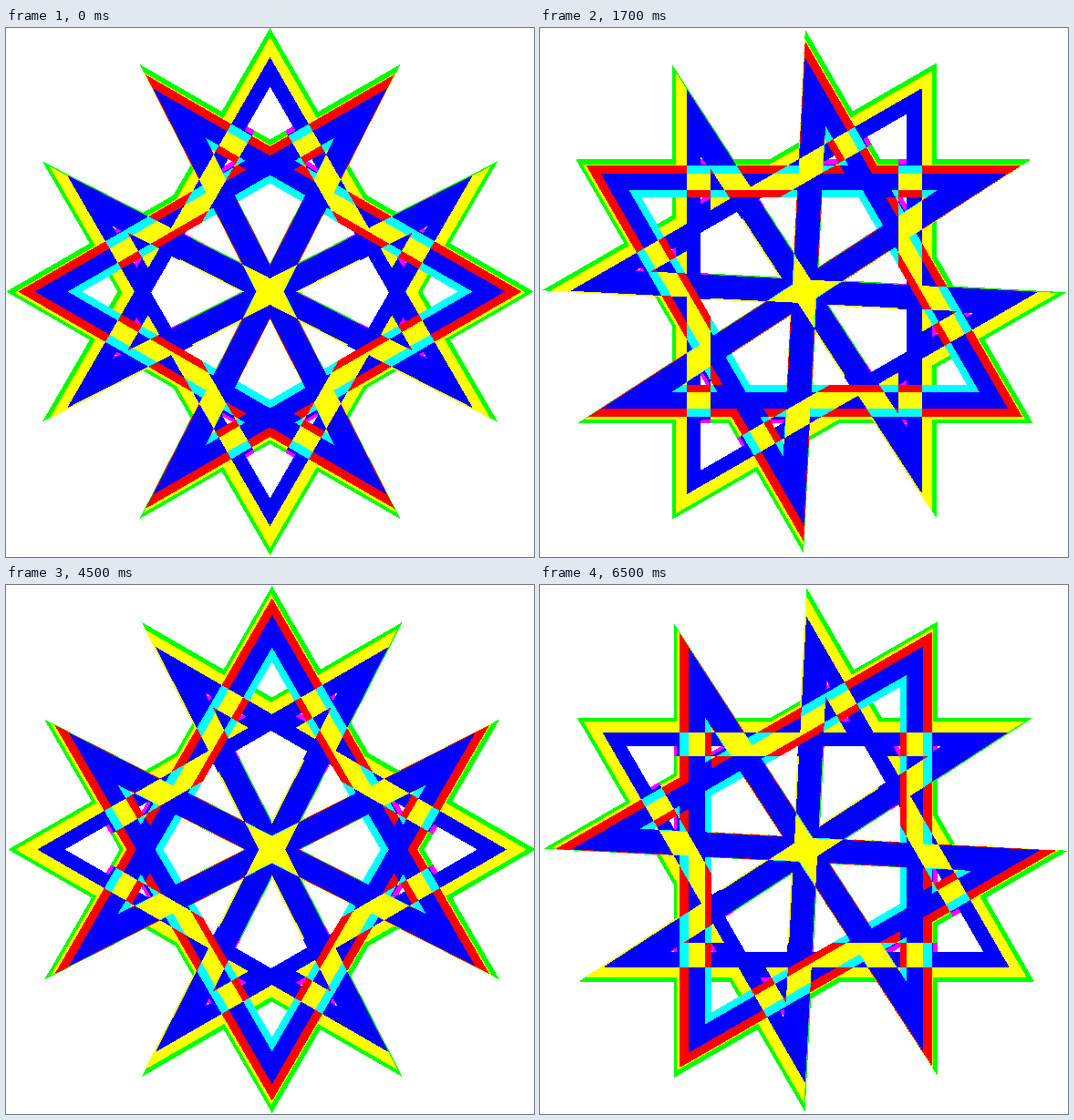
These frames come from a looping animation (579x581 px, 8000 ms). An HTML page with a canvas:

```html
<!DOCTYPE html>
<html lang="en">
<head>
<meta charset="utf-8">
<title>Turning star</title>
<style>
  html, body { margin: 0; width: 100%; height: 100%; overflow: hidden; background: #fff; }
  canvas { display: block; }
</style>
</head>
<body>
<canvas id="stage" width="579" height="581"></canvas>
<script>
const W = 579, H = 581, LOOP = 8000, STEP = 2000, LEAD = 1500;
const RAD = Math.PI / 180;
const EDGE = 144.7;          // distance from the centre to the outer chords
const TILT = 27 * RAD;       // slope of the bars through the centre
const CENTRES = [[289.5, 289.5], [289.9, 289.2], [291.2, 289.7], [291.7, 290.5], [291.5, 290.7]];

const stage = document.getElementById('stage').getContext('2d');
const scratch = document.createElement('canvas');
scratch.width = W;
scratch.height = H;
const pen = scratch.getContext('2d', { willReadFrequently: true });

// Strokes the six-cornered ribbon whose chords lie between two depths.
function ribbon(near, far) {
  const chord = EDGE - (near + far) / 2;
  const reach = chord / Math.cos(TILT + 30 * RAD);
  const x = reach * Math.cos(TILT), y = reach * Math.sin(TILT), tip = 2 * chord;
  pen.lineWidth = far - near;
  pen.beginPath();
  for (const p of [[0, -tip], [x, y], [-x, -y], [0, tip], [x, -y], [-x, y]]) pen.lineTo(...p);
  pen.closePath();
  pen.stroke();
}

// Alpha mask of the ribbon, drawn once for each of the given turns.
function mask([cx, cy], angle, turns, near, far, drop = 0) {
  pen.setTransform(1, 0, 0, 1, 0, 0);
  pen.clearRect(0, 0, W, H);
  for (const turn of turns) {
    pen.setTransform(1, 0, 0, 1, cx, cy);
    pen.rotate(angle * RAD);
    pen.translate(0, drop);
    pen.rotate(turn * RAD);
    ribbon(near, far);
  }
  const data = pen.getImageData(0, 0, W, H).data;
  return i => data[4 * i + 3] > 127;
}

function star(centre, index) {
  const layer = (...args) => mask(centre, index * 30, ...args);
  const green = layer([0, 90], 0, 28.2);
  const yellow = layer([0, 90], 4.5, 31.7, 1);
  const red = layer([90], 6.6, 33.8);
  const flipA = layer([0], 16, 41.8);
  const flipB = layer([90], 15.8, 41.6);
  const image = new ImageData(W, H);
  for (let i = 0; i < W * H; i++) {
    const a = flipA(i), b = flipB(i), r = red(i);
    // bits: 4 red, 2 green, 1 blue
    let c = 0;
    if (r && b) c = 6;
    else if (r || b) c = 4;
    else if (yellow(i)) c = 6;
    else if (green(i)) c = 2;
    if (a !== b) c ^= 7;
    if (c === 0) c = 7;      // empty ground is white
    image.data.set([c & 4 ? 255 : 0, c & 2 ? 255 : 0, c & 1 ? 255 : 0, 255], 4 * i);
  }
  return image;
}

const poses = CENTRES.map(star);
let shown = -1;

function draw(time) {
  const index = Math.floor((time % LOOP + LEAD) / STEP);
  if (index !== shown) stage.putImageData(poses[index], 0, 0);
  shown = index;
}

const start = performance.now();
function tick() {
  draw(performance.now() - start);
  requestAnimationFrame(tick);
}
tick();
</script>
</body>
</html>
```
